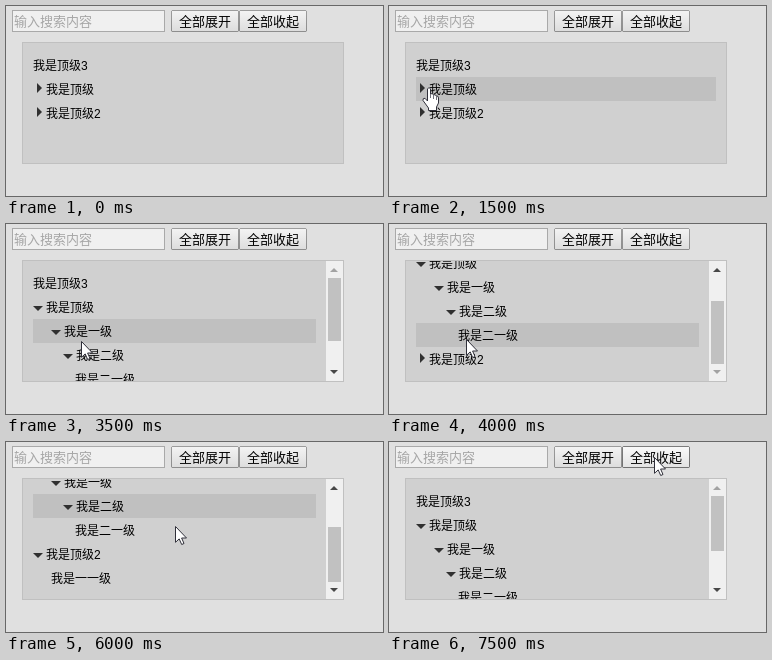
These frames come from a looping animation (377x190 px, 8000 ms). An HTML page with a canvas:

```html
<!DOCTYPE html>
<html lang="zh">
<head>
<meta charset="utf-8">
<style>
html, body { margin: 0; width: 100%; height: 100%; overflow: hidden; background: #e0e0e0; }
canvas { display: block; }
</style>
</head>
<body>
<canvas id="stage" width="377" height="190"></canvas>
<script>
const ctx = document.getElementById('stage').getContext('2d');
const STEP = 500;
const ROW = 24, PAD = 10;
const view = { x: 17, y: 37, w: 320, h: 120 };
const track = { y: 54, h: 86 };

// A row shows once `open` reaches `from`, and unfolds when it reaches `at`.
const rows = [
  { text: '我是顶级3', indent: 0, from: 0 },
  { text: '我是顶级', indent: 0, from: 0, at: 1 },
  { text: '我是一级', indent: 18, from: 1, at: 2 },
  { text: '我是二级', indent: 30, from: 2, at: 3 },
  { text: '我是二一级', indent: 42, from: 3 },
  { text: '我是顶级2', indent: 0, from: 0, at: 4 },
  { text: '我是一一级', indent: 18, from: 4 }
];

const step = (cursor, x, y, hover, open, scroll = 0) => ({ cursor, x, y, hover, open, scroll });
const steps = [
  step(null, 0, 0, -1, 0),
  step(arrow, 159, 80, 1, 0),
  step(arrow, 72, 75, 1, 0),
  step(hand, 33, 81, 1, 0),
  step(hand, 43, 106, 2, 1),
  step(hand, 48, 107, 2, 1),
  step(hand, 54, 128, 3, 2),
  step(arrow, 75, 117, 2, 3),
  step(arrow, 77, 115, 4, 3, 44),
  step(hand, 57, 95, 3, 3, 44),
  step(hand, 29, 130, 5, 3, 44),
  step(hand, 29, 130, 5, 4, 44),
  step(arrow, 169, 84, 3, 4, 67),
  step(arrow, 169, 84, 4, 4, 68),
  step(arrow, 188, 32, -1, 4),
  step(arrow, 265, 15, -1, 4)
];

function rect(x, y, w, h, color) {
  ctx.fillStyle = color;
  ctx.fillRect(x, y, w, h);
}

function poly(color, ...p) {
  ctx.beginPath();
  for (let i = 0; i < p.length; i += 2) ctx.lineTo(p[i], p[i + 1]);
  ctx.closePath();
  ctx.fillStyle = color;
  ctx.fill();
}

function label(text, x, y, size, color) {
  ctx.font = size + 'px "Liberation Sans", "Noto Sans CJK SC", "Noto Sans CJK", sans-serif';
  ctx.fillStyle = color;
  ctx.fillText(text, x, y);
}

function outline() {
  ctx.fillStyle = '#fff';
  ctx.strokeStyle = '#30303a';
  ctx.lineWidth = 1;
  ctx.lineJoin = 'round';
  ctx.fill();
  ctx.stroke();
}

function arrow() {
  ctx.beginPath();
  ctx.moveTo(0.5, 0.5);
  ctx.lineTo(0.5, 16.3);
  ctx.lineTo(4.2, 12.9);
  ctx.lineTo(6.7, 18.5);
  ctx.lineTo(9, 17.5);
  ctx.lineTo(6.6, 12);
  ctx.lineTo(11.5, 12);
  ctx.closePath();
  outline();
}

function hand() {
  ctx.beginPath();
  ctx.moveTo(5.5, 14);
  ctx.lineTo(5.5, 2);
  ctx.quadraticCurveTo(7, -1, 8.5, 2);
  ctx.lineTo(8.5, 7);
  ctx.quadraticCurveTo(10.5, 5.5, 11.5, 8);
  ctx.quadraticCurveTo(13.5, 6.7, 14.2, 9);
  ctx.quadraticCurveTo(16.5, 8.5, 16.5, 11);
  ctx.lineTo(16.5, 16);
  ctx.lineTo(14.5, 20);
  ctx.lineTo(14.5, 23.5);
  ctx.lineTo(6.5, 23.5);
  ctx.lineTo(6.5, 21);
  ctx.lineTo(1, 13.5);
  ctx.quadraticCurveTo(0.5, 11, 3, 11.3);
  ctx.closePath();
  outline();
  for (const [x, y] of [[8, 7], [11, 8], [14, 9]]) rect(x, y, 1, 4, '#70707a');
}

function button(x, text, hot) {
  const fill = ctx.createLinearGradient(0, 4, 0, 26);
  fill.addColorStop(0, hot ? '#fafafa' : '#f4f4f4');
  fill.addColorStop(1, hot ? '#e2e2e2' : '#dcdcdc');
  rect(x, 4, 68, 22, fill);
  ctx.beginPath();
  ctx.roundRect(x + 0.5, 4.5, 67, 21, 1);
  ctx.strokeStyle = hot ? 'rgba(0,0,0,0.5)' : 'rgba(0,0,0,0.36)';
  ctx.lineWidth = 1;
  ctx.stroke();
  label(text, x + 8, 20, 13, '#000');
}

function toolbar(hot) {
  rect(6, 4, 153, 22, '#a9a9a9');
  rect(7, 5, 151, 20, '#f0f0f0');
  label('输入搜索内容', 8, 20, 13, '#a6a6a6');
  button(165, '全部展开', false);
  button(233, '全部收起', hot);
}

function scrollbar(total, scroll) {
  rect(320, 37, 17, 120, '#f0f0f0');
  const tone = on => on ? '#484848' : '#a3a3a3';
  poly(tone(scroll > 0), 324, 48, 332, 48, 328, 44);
  poly(tone(scroll < total - view.h), 324, 146, 332, 146, 328, 150);
  const top = Math.round(track.y + track.h * scroll / total);
  rect(322, top, 13, Math.round(track.h * view.h / total), '#c1c1c1');
}

function tree({ open, hover, scroll }) {
  rect(16, 36, 322, 122, '#c0c0c0');
  rect(view.x, view.y, view.w, view.h, '#d0d0d0');
  const shown = rows.filter(r => r.from <= open);
  const total = shown.length * ROW + 2 * PAD;
  const bar = total > view.h;

  ctx.save();
  ctx.beginPath();
  ctx.rect(view.x, view.y, view.w, view.h);
  ctx.clip();
  shown.forEach((r, i) => {
    const y = view.y + PAD + i * ROW - scroll;
    const x = 27 + r.indent;
    if (r === rows[hover]) rect(27, y, bar ? 283 : 300, ROW, '#c0c0c0');
    if (r.at) {
      if (open >= r.at) poly('#303030', x, y + 11, x + 10, y + 11, x + 5, y + 16);
      else poly('#303030', x + 4, y + 6, x + 4, y + 16, x + 9, y + 11);
    }
    label(r.text, x + (r.at ? 13 : 0), y + 17, 12, '#000');
  });
  if (bar) scrollbar(total, scroll);
  ctx.restore();
}

function draw(time) {
  const i = Math.floor(time / STEP) % steps.length;
  const s = steps[i];
  rect(0, 0, 377, 190, '#e0e0e0');
  toolbar(s.y < 26 && s.x > 233);
  tree(s);
  if (s.cursor) {
    ctx.save();
    ctx.translate(s.x, s.y);
    s.cursor();
    ctx.restore();
  }
}

const start = performance.now();
function tick() {
  draw(performance.now() - start);
  requestAnimationFrame(tick);
}
tick();
</script>
</body>
</html>
```
